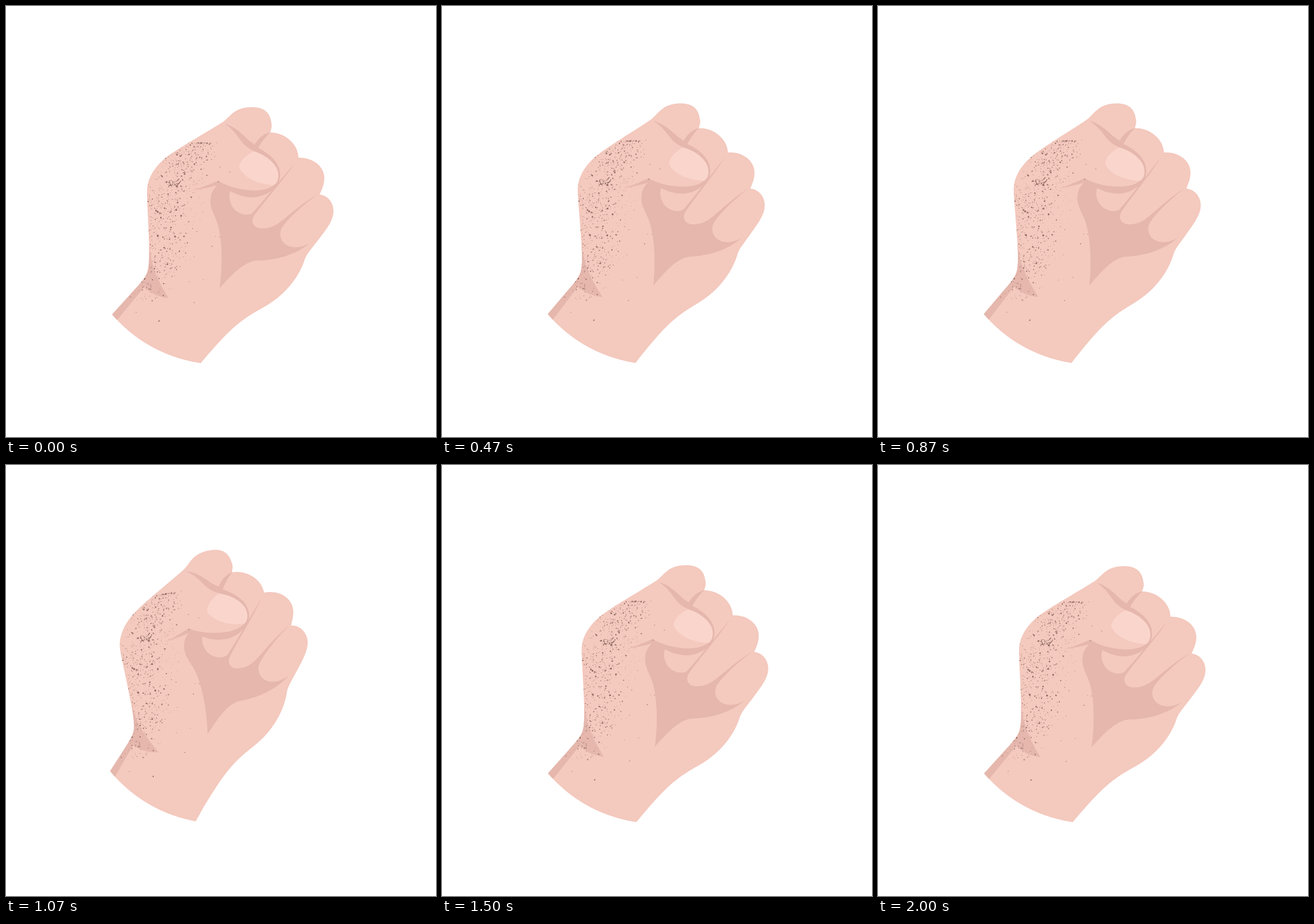
An HTML page with a canvas for the animation above (2330 ms loop, 747x750 px).

```html
<!DOCTYPE html>
<html lang="en">
<head>
<meta charset="utf-8">
<title>Shaking fist</title>
<style>
  html, body { margin: 0; width: 100%; height: 100%; overflow: hidden; background: #fff; }
  canvas { display: block; }
</style>
</head>
<body>
<canvas id="stage" width="747" height="750"></canvas>
<script>
const ctx = document.getElementById('stage').getContext('2d');
const W = 747, H = 750;
const SKIN = '#f4c9be', SHADE = '#e5b7ad', NAIL = '#fad5cc';
const LOOP = 2330, FRAMES = 60, KEY = 10;
const SWING = [0, -12, 16.8, -12, 13, -14, 0];
const PIVOT = { x: 223, y: 606 };

const hand = new Path2D(`M150 576 L185 536 L222 495 C233 483 240 475 244 467
  C250 455 249 430 248 400 C247 365 245 345 245 321
  C246 296 262 274 287 257 C315 238 350 219 378 201
  C390 192 397 176 427 176 C449 176 459 186 461 203 C463 211 460 215 459 220
  C484 220 508 240 508 264 C534 263 553 280 553 299 C553 312 548 320 545 328
  C560 330 569 343 569 357 C569 373 557 388 544 405 C530 424 522 431 518 444
  C509 470 487 502 448 524 C408 546 391 559 338 622 L300 670 L230 690 Z`);

const wrist = new Path2D(`M248 412 C251 452 265 480 282 508
  C267 507 253 501 240 489 L165 581 L135 576 L236 460 Z`);

const palm = new Path2D(`M371 491 C377 450 376 398 365 372
  C358 355 353 347 356 331 C358 322 362 317 367 312 C352 316 337 319 322 320
  C341 317 356 309 369 304 C378 311 404 321 434 321 C458 320 472 312 474 293
  L476 292 C478 314 455 331 430 333 C413 333 400 328 390 322
  C385 334 391 349 398 355 C406 363 419 365 427 361
  C442 346 472 308 503 272 C476 310 446 343 430 366
  C424 378 432 388 447 387 C475 387 488 360 542 327
  C515 347 488 371 478 388 C472 405 484 420 503 420 C512 420 520 417 527 413
  C505 432 470 443 435 443 C413 445 392 468 371 491 Z`);

const crease = new Path2D(`M380 205 C405 212 415 231 432 241
  C439 229 449 222 459 220 C450 228 444 237 438 247
  C459 257 477 275 476 293 L473 302 C475 282 457 264 432 253
  C404 241 407 222 380 205 Z`);

const nail = new Path2D(`M405 281 C406 270 417 258 431 253
  C452 259 472 276 473 292 C474 303 470 309 465 312 C439 310 414 300 405 281 Z`);

// Arm is cut by a fixed round edge; the fist may pass it on the right.
const cut = new Path2D();
cut.arc(W / 2, H / 2, 249, 0, Math.PI * 2);
cut.rect(W / 2, 0, W / 2, H);

let seed = 71;
function rnd() {
  seed = (seed * 16807) % 2147483647;
  return seed / 2147483647;
}
const bell = () => rnd() + rnd() + rnd() - 1.5;

function addGrain(path, x, y, r) {
  const a = rnd() * 6.28;
  for (let i = 0; i < 4; i++) {
    const b = a + i * 1.57, k = r * (0.6 + rnd() * 0.7);
    const px = x + Math.cos(b) * k, py = y + Math.sin(b) * k;
    i ? path.lineTo(px, py) : path.moveTo(px, py);
  }
  path.closePath();
}

// Spine of the freckled area: y, centre x, half width
const spine = [[236, 342, 18], [262, 312, 48], [300, 292, 50], [350, 276, 46],
  [400, 270, 46], [450, 272, 38], [490, 247, 40], [515, 236, 30]];

function spineAt(y) {
  let i = 1;
  while (i < spine.length - 1 && spine[i][0] < y) i++;
  const a = spine[i - 1], b = spine[i], k = (y - a[0]) / (b[0] - a[0]);
  return [a[1] + (b[1] - a[1]) * k, a[2] + (b[2] - a[2]) * k];
}

const faint = new Path2D(), dark = new Path2D();
for (let i = 0; i < 900; i++) {
  const y = 238 + 275 * Math.pow(rnd(), 1.3);
  const [cx, w] = spineAt(y);
  const x = cx + bell() * w;
  if (y > 470 && rnd() < 0.5) continue;
  const big = rnd();
  addGrain(rnd() < 0.5 ? faint : dark, x, y, 0.55 + big * big * big * 1.2);
}
for (let i = 0; i < 28; i++) addGrain(dark, 291 + bell() * 16, 308 + bell() * 7, 0.7 + rnd() * 0.9);
for (let i = 0; i < 50; i++) addGrain(faint, 328 + bell() * 24, 335 + bell() * 50, 0.6);
[[266, 548, 1.7], [327, 516, 1.1], [318, 480, 0.8], [343, 476, 0.7], [226, 533, 0.8],
 [358, 418, 1.1], [364, 401, 0.7], [371, 402, 0.7], [389, 289, 0.9], [372, 280, 1.1],
 [369, 306, 1], [315, 412, 1.7], [304, 365, 1.8], [309, 322, 1.5], [241, 475, 1.6],
 [350, 268, 1.3]].forEach(g => addGrain(dark, ...g));

function frameAt(t) {
  let n = Math.round(t * 0.03);
  if (Math.round(n * 10 / 3) * 10 > t) n--;
  return Math.max(0, Math.min(FRAMES, n));
}

function angleAt(n) {
  const i = Math.min(Math.floor(n / KEY), SWING.length - 2);
  const s = n / KEY - i;
  return SWING[i] + (SWING[i + 1] - SWING[i]) * s * s * (3 - 2 * s);
}

function fill(path, color) {
  ctx.fillStyle = color;
  ctx.fill(path);
}

function draw(angle) {
  ctx.fillStyle = '#fff';
  ctx.fillRect(0, 0, W, H);
  ctx.save();
  ctx.clip(cut);
  ctx.translate(PIVOT.x, PIVOT.y);
  ctx.rotate(angle * Math.PI / 180);
  ctx.translate(-PIVOT.x, -PIVOT.y);
  fill(hand, SKIN);
  ctx.clip(hand);
  fill(wrist, SHADE);
  fill(palm, SHADE);
  fill(crease, SHADE);
  fill(nail, NAIL);
  fill(faint, 'rgba(150,112,102,0.6)');
  fill(dark, 'rgba(122,88,80,0.85)');
  ctx.restore();
}

const start = performance.now();
function tick() {
  draw(angleAt(frameAt((performance.now() - start) % LOOP)));
  requestAnimationFrame(tick);
}
tick();
</script>
</body>
</html>
```
